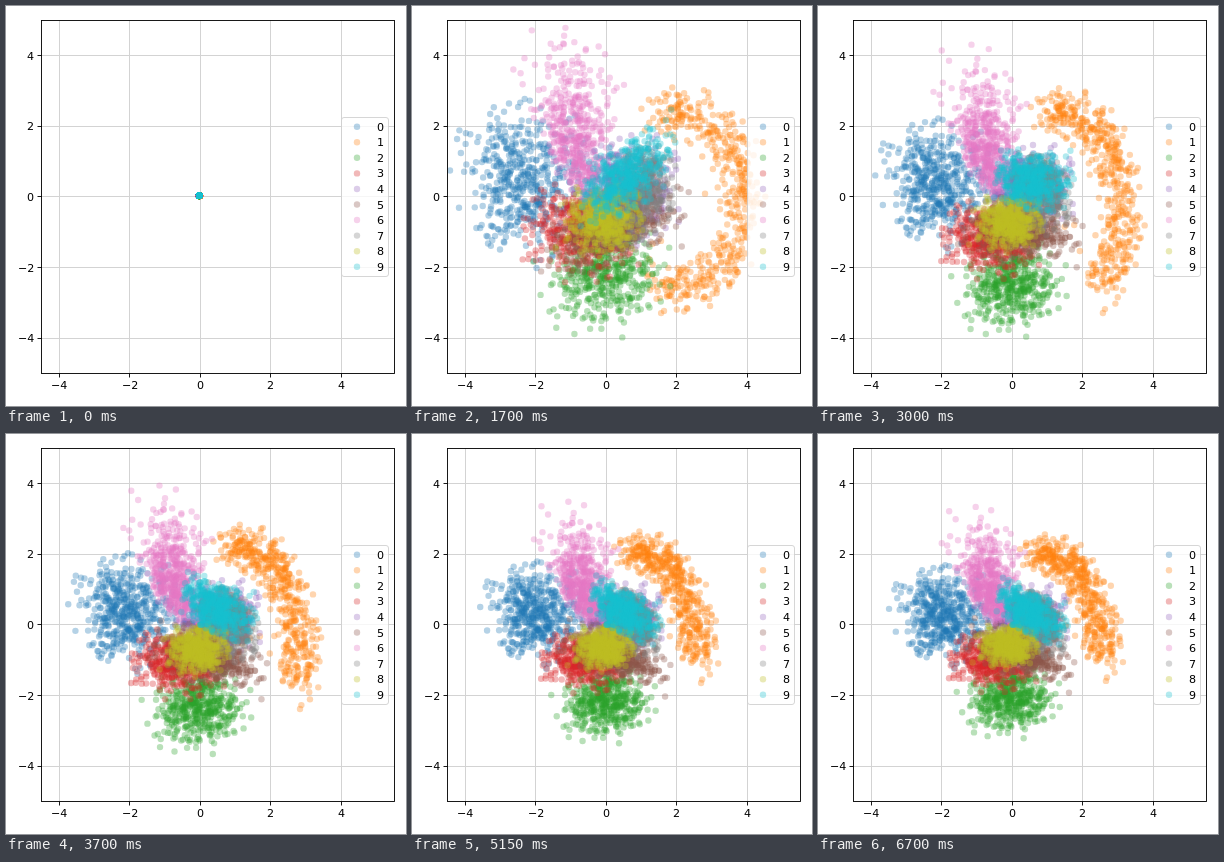
Animation of 400 by 400 pixels, one loop 6.75 s. Source, as an HTML page with a canvas:

```html
<!DOCTYPE html>
<html lang="en">
<head>
<meta charset="utf-8">
<title>Latent space</title>
<style>
html, body { margin: 0; width: 100%; height: 100%; overflow: hidden; background: #fff; }
canvas { display: block; width: 400px; height: 400px; }
</style>
</head>
<body>
<canvas id="stage" width="400" height="400"></canvas>
<script>
const ctx = document.getElementById('stage').getContext('2d');
const LOOP = 6750, STEP = 50, COUNT = 500, TAU = Math.PI * 2;
const COLORS = ['#1f77b4', '#ff7f0e', '#2ca02c', '#d62728', '#9467bd',
  '#8c564b', '#e377c2', '#7f7f7f', '#bcbd22', '#17becf'];
const TICKS = [-4, -2, 0, 2, 4];

const px = x => 194.3 + 35.3 * x;
const py = y => 190.9 - 35.3 * y;
const snap = v => Math.floor(v) + 0.5;
const mix = (a, b, k) => a + (b - a) * k;
const ramp = (t, from, to) => Math.max(0, Math.min(1, (t - from) / (to - from)));
const smooth = k => k * k * (3 - 2 * k);

let seed = 7;
function random() {
  seed = (seed * 1664525 + 1013904223) % 4294967296;
  return seed / 4294967296;
}
const bell = () => (random() + random() + random() - 1.5) * 2;

// All clouds share one motion, which depends on the time alone
function motionAt(t) {
  const age = Math.max(0, t - 1100) / 850;
  const open = ramp(t, 700, 1100);
  const grow = Math.max(0.005, ramp(t, 0, 700) ** 2);
  const swell = 0.4 * age * Math.exp(1 - age);
  return {
    fast: 1 - Math.exp(-age),
    slow: smooth(ramp(t, 1100, 4450)),
    right: grow * (1 + 0.3 * swell),
    left: grow * (1 + 0.3 * swell) * mix(0.5, 1, open),
    tall: grow * (1 + swell) * mix(0.25, 1, open),
    shift: 0.03 * (1 - open),
  };
}

// A cloud tightens round its home; the lower ones come down from the middle
function cloud(x, y, width, height, { tilt = 0, flare = 0 } = {}) {
  return (p, { fast, slow }) => {
    const spread = mix(1.4, 1, fast);
    const dx = width * spread * p.a * (1 + flare * p.b);
    const dy = height * spread * (p.b + 0.4 * flare * (p.b * p.b - 1));
    return [
      x * mix(1.15, 1, fast) + dx - flare * dy / 2,
      y * mix(y < 0 ? 0.5 : 1.1, 1, fast) + dy + tilt * mix(-1, 1, slow) * dx,
    ];
  };
}

// A half ring that closes up to a quarter ring
function arc(p, { slow }) {
  const angle = mix(mix(-115, -12, slow), mix(105, 92, slow), p.u) * TAU / 360;
  return [
    mix(1.75, 0.7, slow) + 1.8 * Math.cos(angle) + 0.26 * p.a,
    mix(0, -0.5, slow) + mix(1.75, 2.5, slow) * Math.sin(angle) + 0.24 * p.b,
  ];
}

const shapes = [
  cloud(-2, 0.35, 0.55, 0.58),
  arc,
  cloud(-0.1, -2.1, 0.55, 0.4),
  cloud(-0.6, -1, 0.5, 0.32),
  cloud(0.45, 0.15, 0.45, 0.4),
  cloud(0.2, -0.8, 0.6, 0.25, { tilt: -0.3 }),
  cloud(-0.7, 1.3, 0.32, 0.62, { flare: 0.3 }),
  cloud(0.75, 0.1, 0.35, 0.35, { tilt: -0.4 }),
  cloud(-0.1, -0.6, 0.36, 0.24),
  cloud(0.5, 0.4, 0.4, 0.28, { tilt: -0.5 }),
];

// A few points are hard to tell apart and stay nearer the middle
const clouds = shapes.map(() => Array.from({ length: COUNT }, () => ({
  a: bell(), b: bell(), u: random(), pull: random() < 0.06 ? random() : 1,
})));

function dot(x, y) {
  ctx.beginPath();
  ctx.arc(x, y, 3.2, 0, TAU);
  ctx.fill();
}

function line(x1, y1, x2, y2) {
  ctx.beginPath();
  ctx.moveTo(x1, y1);
  ctx.lineTo(x2, y2);
  ctx.stroke();
}

// Text on whole pixels; align is 0 for left, 0.5 for centre, 1 for right
function label(text, x, y, align) {
  ctx.fillText(text, Math.round(x - align * ctx.measureText(text).width), Math.round(y));
}

function drawGrid() {
  ctx.fillStyle = '#fff';
  ctx.fillRect(0, 0, 400, 400);
  ctx.strokeStyle = '#d3d3d3';
  ctx.lineWidth = 1;
  for (const v of TICKS) {
    line(snap(px(v)), 14.5, snap(px(v)), 367.5);
    line(35.5, snap(py(v)), 388.5, snap(py(v)));
  }
}

function drawPoints(t) {
  const motion = motionAt(t);
  ctx.save();
  ctx.beginPath();
  ctx.rect(35.5, 14.5, 353, 353);
  ctx.clip();
  ctx.globalAlpha = 0.33;
  clouds.forEach((points, i) => {
    const sway = 0.03 * Math.sin(t / 320 + i * 2);
    ctx.fillStyle = COLORS[i];
    for (const p of points) {
      const [x, y] = shapes[i](p, motion);
      const side = x < 0 ? motion.left : motion.right;
      dot(px((x + sway) * p.pull * side - motion.shift),
        py((y - sway) * p.pull * motion.tall + motion.shift));
    }
  });
  ctx.restore();
}

function drawAxes() {
  ctx.strokeStyle = ctx.fillStyle = '#000';
  ctx.lineWidth = 0.9;
  ctx.strokeRect(35.5, 14.5, 353, 353);
  ctx.font = '11.11px "DejaVu Sans", sans-serif';
  for (const v of TICKS) {
    const x = snap(px(v)), y = snap(py(v)), text = String(v).replace('-', '\u2212');
    line(x, 367.5, x, 371.5);
    line(31.5, y, 35.5, y);
    label(text, px(v), 383, 0.5);
    label(text, 28, py(v) + 4, 1);
  }
}

function drawLegend() {
  ctx.beginPath();
  ctx.roundRect(335.5, 111.5, 47, 159, 2.5);
  ctx.fillStyle = 'rgba(255,255,255,.8)';
  ctx.strokeStyle = 'rgba(204,204,204,.8)';
  ctx.lineWidth = 1;
  ctx.fill();
  ctx.stroke();
  COLORS.forEach((color, i) => {
    const y = 120.7 + 15.56 * i;
    ctx.globalAlpha = 0.33;
    ctx.fillStyle = color;
    dot(351, y);
    ctx.globalAlpha = 1;
    ctx.fillStyle = '#000';
    label(i, 371, y + 4, 0);
  });
}

const start = performance.now();
function frame() {
  const t = Math.floor((performance.now() - start) % LOOP / STEP) * STEP;
  drawGrid();
  drawPoints(t);
  drawAxes();
  drawLegend();
  requestAnimationFrame(frame);
}
frame();
</script>
</body>
</html>
```
